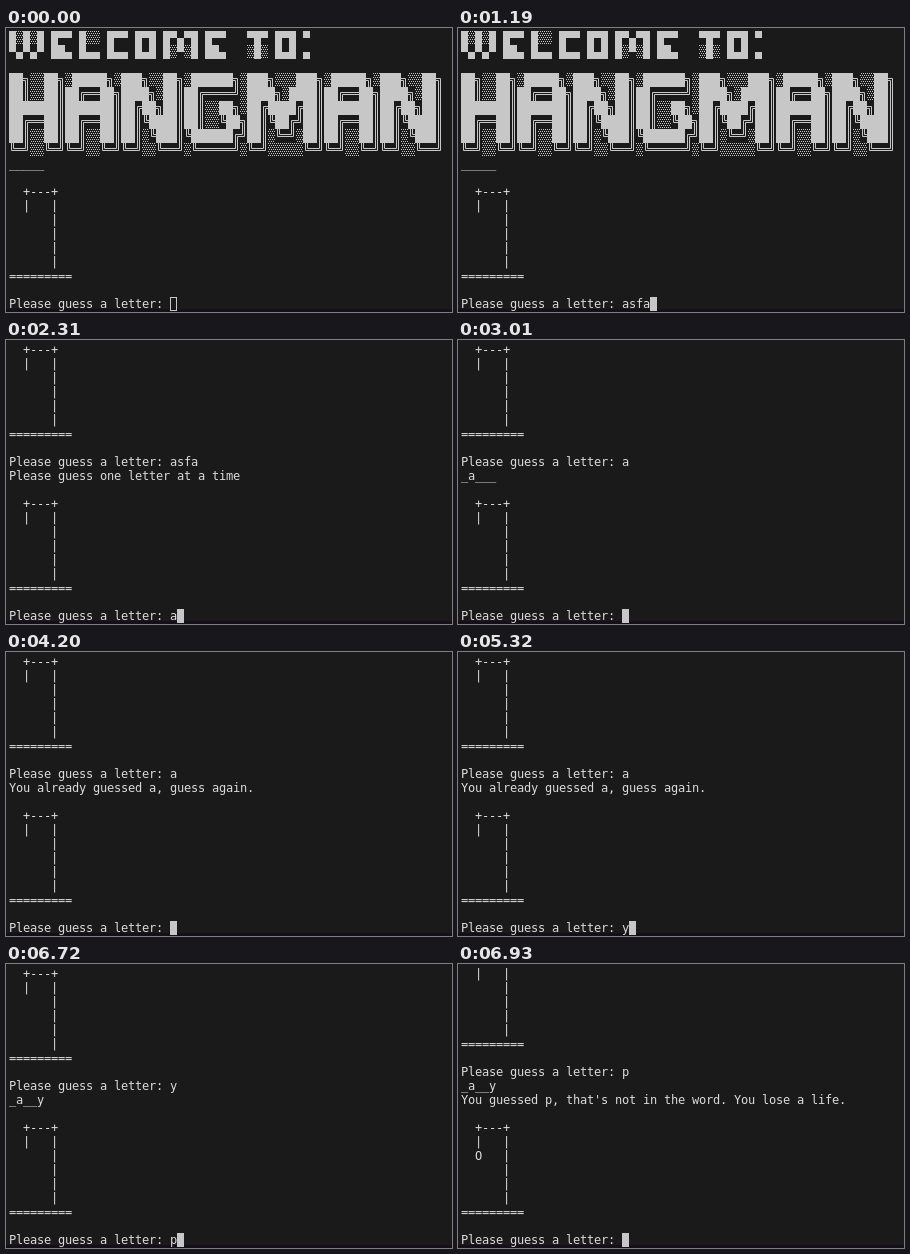
Animation, 446 px wide and 284 px high, one loop 8 s. Source, as an HTML page with a canvas:

```html
<!DOCTYPE html>
<html lang="en">
<head>
<meta charset="utf-8">
<title>Hangman in a terminal</title>
<style>
  html, body { margin: 0; width: 100%; height: 100%; overflow: hidden; background: #1a1a1b; }
  canvas { display: block; }
</style>
</head>
<body>
<canvas id="term" width="446" height="284"></canvas>
<script>
const ctx = document.getElementById('term').getContext('2d');
const LOOP = 8000, CELL_W = 7, CELL_H = 14, PAD = 3;
const BG = '#1a1a1b', EDGE = '#150f18', FILL = '#c7c7c7', TEXT = '#dcdcdc';
const PROMPT = 'Please guess a letter: ';

const BANNER = `
█░█░█ █▀▀ █░░ █▀▀ █▀█ █▀▄▀█ █▀▀   ▀█▀ █▀█ ▀
▀▄▀▄▀ ██▄ █▄▄ █▄▄ █▄█ █░▀░█ ██▄   ░█░ █▄█ ▄

██╗░░██╗░█████╗░███╗░░██╗░██████╗░███╗░░░███╗░█████╗░███╗░░██╗
██║░░██║██╔══██╗████╗░██║██╔════╝░████╗░████║██╔══██╗████╗░██║
███████║███████║██╔██╗██║██║░░██╗░██╔████╔██║███████║██╔██╗██║
██╔══██║██╔══██║██║╚████║██║░░╚██╗██║╚██╔╝██║██╔══██║██║╚████║
██║░░██║██║░░██║██║░╚███║╚██████╔╝██║░╚═╝░██║██║░░██║██║░╚███║
╚═╝░░╚═╝╚═╝░░╚═╝╚═╝░░╚══╝░╚═════╝░╚═╝░░░░░╚═╝╚═╝░░╚═╝╚═╝░░╚══╝
_____`.slice(1).split('\n');

const gallows = (head = ' ') => [
  '  +---+', '  |   |', `  ${head}   |`,
  ...Array(3).fill('      |'), '=========', ''
];
const turn = (guess, reply) => [...gallows(), PROMPT + guess, reply, '', ...gallows()];

const intro = [...BANNER, '', ...gallows()];
const tooLong = turn('asfa', 'Please guess one letter at a time');
const hit = turn('a', '_a___');
const repeat = turn('a', 'You already guessed a, guess again.');
const hitAgain = turn('y', '_a__y');
const miss = [
  ...gallows().slice(1), PROMPT + 'p', '_a__y',
  "You guessed p, that's not in the word. You lose a life.", '', ...gallows('O')
];

// start time, screen, typed text
const STEPS = [
  [0, intro, ''], [350, intro, ''],
  [910, intro, 'a'], [980, intro, 'as'], [1050, intro, 'asf'], [1190, intro, 'asfa'],
  [1400, tooLong, ''], [2310, tooLong, 'a'],
  [3010, hit, ''], [3780, hit, 'a'],
  [4200, repeat, ''], [5320, repeat, 'y'],
  [5600, hitAgain, ''], [6720, hitAgain, 'p'],
  [6930, miss, '']
];

// horizontal and vertical arm of each double corner
const CORNERS = { '╔': [1, 1], '╗': [-1, 1], '╚': [1, -1], '╝': [-1, -1] };

function line(...pts) {
  ctx.beginPath();
  pts.forEach(([x, y]) => ctx.lineTo(x, y));
  ctx.stroke();
}

function shade(x, y) {
  for (let j = 0; j < CELL_H; j += 2)
    for (let i = 0; i < CELL_W; i++)
      if ((x + i + (y + j >> 1)) % 2) ctx.fillRect(x + i, y + j, 1, 1);
}

function drawCell(ch, x, y) {
  const cx = x + 3.5, cy = y + 6.5, half = CELL_H / 2;
  ctx.fillStyle = ctx.strokeStyle = FILL;
  if (ch === '█') ctx.fillRect(x, y, CELL_W, CELL_H);
  else if (ch === '▀') ctx.fillRect(x, y, CELL_W, half);
  else if (ch === '▄') ctx.fillRect(x, y + half, CELL_W, half);
  else if (ch === '░') shade(x, y);
  else if (ch === '║') for (const d of [-1, 1]) line([cx + d, y], [cx + d, y + CELL_H]);
  else if (ch === '═') for (const d of [-1, 1]) line([x, cy + d], [x + CELL_W, cy + d]);
  else if (CORNERS[ch]) {
    const [sx, sy] = CORNERS[ch];
    const endX = sx > 0 ? x + CELL_W : x, endY = sy > 0 ? y + CELL_H : y;
    for (const d of [-1, 1])
      line([endX, cy + sy * d], [cx + sx * d, cy + sy * d], [cx + sx * d, endY]);
  } else if (ch !== ' ') {
    ctx.fillStyle = TEXT;
    ctx.fillText(ch, x, y + 11);
  }
}

function drawRow(text, row) {
  [...text].forEach((ch, col) => drawCell(ch, PAD + col * CELL_W, PAD + row * CELL_H));
}

function drawCursor(col, row, hollow) {
  const x = PAD + col * CELL_W, y = PAD + row * CELL_H;
  ctx.fillStyle = ctx.strokeStyle = FILL;
  if (hollow) ctx.strokeRect(x + .5, y + .5, CELL_W - 1, CELL_H - 1);
  else ctx.fillRect(x, y, CELL_W, CELL_H);
}

function draw(step) {
  const [start, screen, typed] = STEPS[step];
  const input = PROMPT + typed;
  ctx.font = '12px "DejaVu Sans Mono", monospace';
  ctx.lineWidth = 1;
  ctx.fillStyle = BG;
  ctx.fillRect(0, 0, 446, 284);
  ctx.fillStyle = EDGE;
  ctx.fillRect(0, 281, 446, 3);
  screen.forEach(drawRow);
  drawRow(input, screen.length);
  drawCursor(input.length, screen.length, start === 0);
}

let shown = -1;
function tick() {
  const t = performance.now() % LOOP;
  const step = STEPS.findLastIndex(([start]) => start <= t);
  if (step !== shown) draw(shown = step);
  requestAnimationFrame(tick);
}
tick();
</script>
</body>
</html>
```
